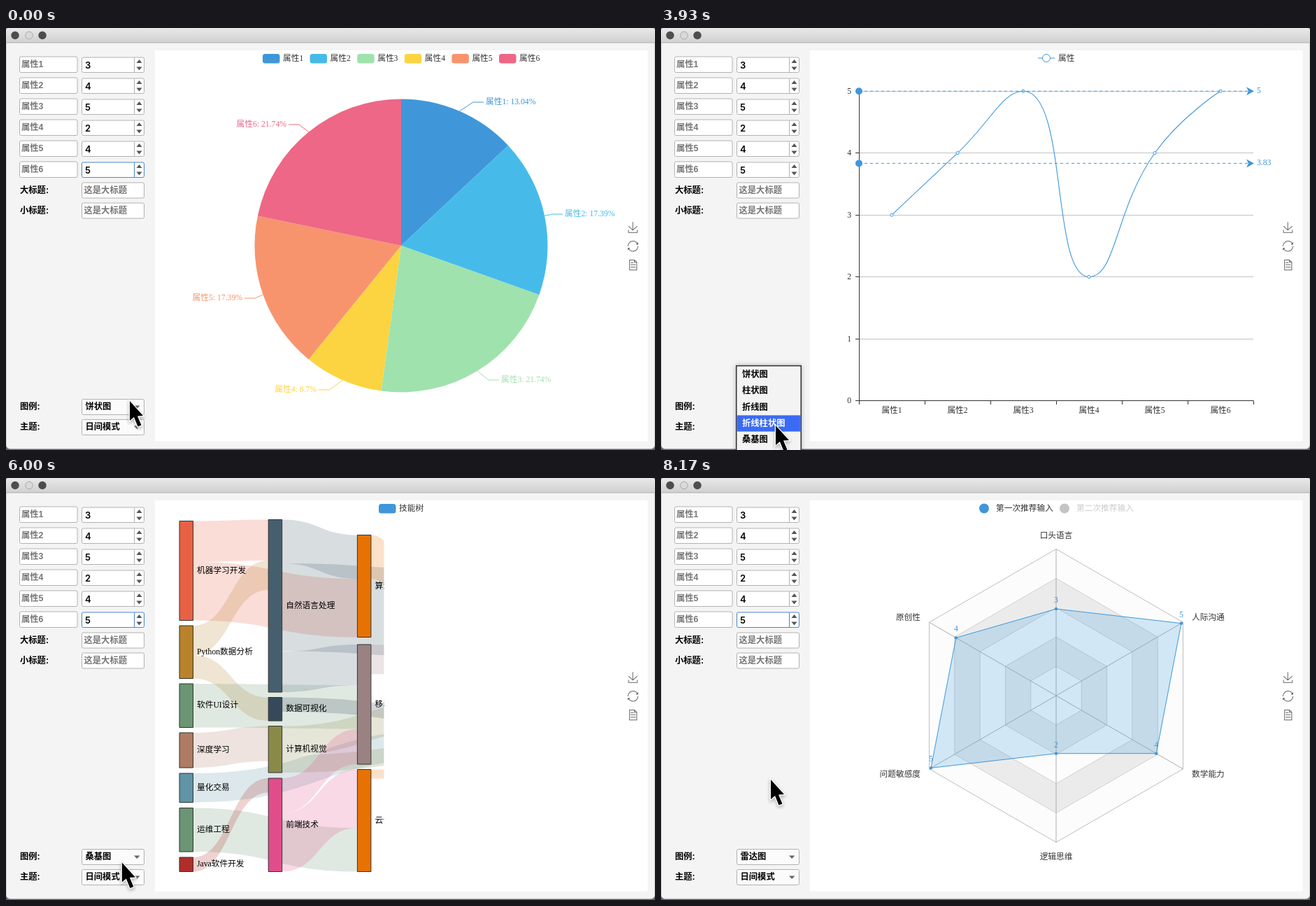
Write an HTML page with a canvas that moves like this. It is 928x603 px and loops after 8.21 s.

```html
<!DOCTYPE html>
<html lang="zh">
<head>
<meta charset="utf-8">
<title>图表</title>
<style>
html,body{margin:0;width:100%;height:100%;overflow:hidden;background:#f4f4f4}
canvas{display:block}
</style>
</head>
<body>
<canvas id="stage" width="928" height="603"></canvas>
<script>
const c = document.getElementById('stage').getContext('2d');
const LOOP = 8210, GROW = 650, FADE = 140;
const UI = '"Liberation Sans","Noto Sans CJK SC","Noto Sans CJK",sans-serif';
const SERIF = '"Liberation Serif","Noto Sans CJK SC","Noto Sans CJK",serif';
const BLUE = '#3f97da', CYAN = '#46bbea', TEAL = '#6fdcde', GREEN = '#9fe2ad',
      YELLOW = '#fcd441', ORANGE = '#f7946e', PINK = '#ee6786';
const vals = [3, 4, 5, 2, 4, 5];
const kinds = ['饼状图', '柱状图', '折线图', '折线柱状图', '桑基图', '雷达图'];
const starts = [0, 947, 2231, 4300, 5650, 7676];
const menus = [
  {open: 150, hover: 420, fade: 940}, {open: 1340, hover: 1450, fade: 2230},
  {open: 3400, hover: 3750, fade: 4290}, {open: 4960, hover: 5250, fade: 5640},
  {open: 6710, hover: 7100, fade: 7660}
];
const track = [
  [0, 177, 533], [300, 176, 533], [700, 172, 531], [1340, 168, 540], [1430, 167, 549],
  [1700, 163, 553], [2400, 163, 553], [2800, 166, 544], [3450, 166, 544], [3930, 164, 568],
  [4400, 164, 566], [4700, 163, 543], [5030, 162, 542], [5430, 159, 563], [5750, 160, 563],
  [6200, 170, 540], [6750, 170, 540], [7200, 165, 561], [7700, 163, 560], [8150, 157, 431], [8210, 157, 431]
];

const clamp = (v, a, b) => Math.max(Math.min(a, b), Math.min(Math.max(a, b), v));
const cubicOut = x => 1 - (1 - x) ** 3;

function text(s, x, y, color = '#333', align = 'left', font = '11.7px ' + SERIF) {
  c.font = font;
  c.fillStyle = color;
  c.textAlign = align;
  c.textBaseline = 'middle';
  c.fillText(s, x, y);
}
const uiText = (s, x, y, color = '#000', size = 12.3) =>
  text(s, x, y + .5, color, 'left', `bold ${size}px ${UI}`);

function rect(x, y, w, h, fill) {
  c.fillStyle = fill;
  c.fillRect(x, y, w, h);
}
function box(x, y, w, h, r, fill, stroke) {
  c.beginPath();
  c.roundRect(x, y, w, h, r);
  if (fill) { c.fillStyle = fill; c.fill(); }
  if (stroke) { c.strokeStyle = stroke; c.lineWidth = 1; c.stroke(); }
}
function dot(x, y, r, fill, stroke) {
  c.beginPath();
  c.arc(x, y, r, 0, 7);
  c.fillStyle = fill;
  c.fill();
  if (stroke) { c.strokeStyle = stroke; c.lineWidth = 1; c.stroke(); }
}
function poly(pts, fill, stroke, open) {
  c.beginPath();
  pts.forEach(p => c.lineTo(p[0], p[1]));
  if (!open) c.closePath();
  if (fill) { c.fillStyle = fill; c.fill(); }
  if (stroke) { c.strokeStyle = stroke; c.lineWidth = 1; c.stroke(); }
}
const line = (x1, y1, x2, y2, color) => poly([[x1, y1], [x2, y2]], null, color, true);

const icon = {
  save: 'M5,23L29,45L54,23M5,44V58H54V44M29,45V0',
  reset: 'M47,19h10V9M56,20C52,9,40,1,27,2C13,4,2,16,2,31M13,41H3v10M4,40c4,11,16,20,29,18c14,-2,25,-14,25,-28',
  data: 'M17,17H33M45,29h-28M11,2v56H51V15L38,2zM38,2v13H51M45,42h-28',
  line: 'M4,29h7l9,-22l8,38l10,-20l3,13h14M4,58h51',
  bar: 'M7,23h10V48h-10zM25,13h10v35h-10zM43,2h10v46h-10zM3,58h54',
  stack: 'M30,2L0,17L30,33L60,17zM0,26L30,41L60,26M0,34L30,49L60,34M0,42L30,57L60,42',
  tile: 'M2,2h23V25H2zM35,2h23V25H35zM2,35h23v23H2zM35,35h23v23H35z',
  zoom: 'M0,13H27M13,27V0M32,13H58V58H13V32',
  back: 'M22,1L10,13l12,12M10,13H55V58H10V32'
};
for (const k in icon) icon[k] = new Path2D(icon[k]);

function toolbox(names, y) {
  names.forEach((n, i) => {
    c.save();
    c.translate(896.5 - 7.7, y + i * 26.8 - 7.7);
    c.scale(.257, .257);
    c.lineWidth = 3.9;
    c.strokeStyle = '#666';
    c.stroke(icon[n]);
    c.restore();
  });
}
const shortTools = () => toolbox(['save', 'reset', 'data'], 285);

function legendBox(x, label, color) {
  box(x, 37, 24.5, 13.5, 3.5, color);
  text(label, x + 29, 44);
}

function pie() {
  const colors = [BLUE, CYAN, GREEN, YELLOW, ORANGE, PINK];
  const labels = [[686, 106], [799, 266], [708, 503], [444, 517], [338, 386], [401, 138]];
  const shares = ['13.04', '17.39', '21.74', '8.7', '17.39', '21.74'];
  let sum = 0;
  vals.forEach((v, i) => {
    const a = sum / 23 * 2 * Math.PI - Math.PI / 2, b = a + v / 23 * 2 * Math.PI, m = (a + b) / 2;
    sum += v;
    c.beginPath();
    c.moveTo(565, 311);
    c.arc(565, 311, 209.5, a, b);
    c.fillStyle = colors[i];
    c.fill();
    const [x, y] = labels[i], side = i < 3 ? 1 : -1;
    poly([[565 + 209.5 * Math.cos(m), 311 + 209.5 * Math.sin(m)], [x - side * 18, y], [x - side * 3, y]], null, colors[i], true);
    text(`属性${i + 1}: ${shares[i]}%`, x, y, colors[i], side > 0 ? 'left' : 'right');
    legendBox(367 + 67.6 * i, '属性' + (i + 1), colors[i]);
  });
  shortTools();
}

const yOf = v => 532.5 - 88.45 * v;
const xOf = i => 330 + 94 * i;

function grid() {
  for (let v = 0; v <= 5; v++) {
    const y = Math.round(yOf(v) - .5) + .5;
    if (v) line(283, y, 847, y, '#c2c2c2');
    line(278, y, 283, y, '#333');
    text(v, 272, y, '#333', 'right');
  }
}
function axes() {
  line(283.5, 90, 283.5, 533, '#333');
  line(283, 532.5, 847.5, 532.5, '#333');
  for (let i = 0; i < 7; i++) {
    const x = Math.round(283 + 94 * i) + .5;
    line(x, 533, x, 538, '#333');
    if (i < 6) text('属性' + (i + 1), xOf(i), 546.5, '#333', 'center');
  }
}

function bars(p) {
  grid();
  const colors = [BLUE, TEAL, YELLOW, ORANGE];
  const g = cubicOut(p);
  vals.forEach((v, i) => colors.forEach((col, k) => {
    const y = yOf(v * g);
    rect(292.5 + 94 * i + 19.9 * k, y, 15.6, 532.5 - y, col);
  }));
  axes();
  ['Science', 'Engineering', 'Technology', 'Mathematics'].forEach((s, k) =>
    legendBox([388.5, 463.5, 558.7, 652.3][k], s, colors[k]));
  toolbox(Object.keys(icon), 204.5);
}

// Smooth spline whose handles stay within each segment's bounds.
function spline(pts) {
  c.beginPath();
  c.moveTo(...pts[0]);
  let h = pts[0];
  for (let i = 1; i < pts.length; i++) {
    const a = pts[i - 1], b = pts[i], n = pts[i + 1];
    let h1 = b, h2 = b;
    if (n) {
      const l1 = Math.hypot(b[0] - a[0], b[1] - a[1]), l2 = Math.hypot(n[0] - b[0], n[1] - b[1]);
      const q = l2 / (l1 + l2);
      h2 = b.map((v, k) => clamp(v + (n[k] - a[k]) * .5 * q, v, n[k]));
      h1 = b.map((v, k) => clamp(v - (h2[k] - v) * l1 / l2, a[k], v));
      h2 = b.map((v, k) => v + (v - h1[k]) * l2 / l1);
    }
    c.bezierCurveTo(...h, ...h1, ...b);
    h = h2;
  }
  c.strokeStyle = BLUE;
  c.lineWidth = 1.1;
  c.stroke();
}

function markLine(y, label) {
  c.setLineDash([4, 4]);
  line(283, y, 840, y, BLUE);
  c.setLineDash([]);
  dot(283, y, 5, BLUE);
  poly([[848, y], [837, y - 6], [840, y], [837, y + 6]], BLUE);
  text(label, 852, y, BLUE);
}

function lines(p, withBars) {
  const g = cubicOut(p);
  grid();
  if (withBars) vals.forEach((v, i) => rect(292.5 + 94 * i, yOf(v * g), 75.2, 88.45 * v * g, BLUE));
  axes();
  const pts = vals.map((v, i) => [xOf(i), yOf(v)]);
  c.save();
  c.beginPath();
  c.rect(283, 60, 564 * p + (p === 1 ? 10 : 0), 480);
  c.clip();
  spline(pts);
  pts.forEach(q => dot(q[0], q[1], 2.1, '#fff', BLUE));
  c.restore();
  markLine(90.3 + 28 * (1 - g), '5');
  markLine(193.4 + 92 * (1 - g), '3.83');
  line(539, 43, 563, 43, BLUE);
  dot(551, 43, 5.5, '#fff', BLUE);
  text('属性', 568, 43.5);
  shortTools();
}

// Nodes: column, top, height, colour, label.
const nodes = [
  [0, 61.5, 142, '#e86144', '机器学习开发'], [0, 211, 75.5, '#b9822b', 'Python数据分析'],
  [0, 294, 62.5, '#6c9574', '软件UI设计'], [0, 364, 50, '#ae7b64', '深度学习'],
  [0, 422, 41.5, '#6094a6', '量化交易'], [0, 471.5, 62.5, '#6c9574', '运维工程'],
  [0, 542, 20.5, '#b02e29', 'Java软件开发'],
  [1, 59.5, 246.5, '#465f6e', '自然语言处理'], [1, 313.5, 33.5, '#36495a', '数据可视化'],
  [1, 354.5, 66.5, '#8a8a48', '计算机视觉'], [1, 429, 133.5, '#e04d8a', '前端技术'],
  [2, 81.5, 146, '#e67204', '算法工程'], [2, 238, 171, '#9a8283', '移动端技术'],
  [2, 416.5, 146, '#e67204', '云计算开发'],
  [3, 130, 271, '#f4f1e4', '算法优化'], [4, 273, 129.5, '#e25079', '']
];
// Links: from, to, height, offset at each end.
const links = [
  [0, 7, 58.5, 0, 0], [0, 11, 83.5, 58.5, 62.5], [1, 7, 42, 0, 58.5], [1, 8, 33.5, 42, 0],
  [2, 12, 62.5, 0, 58], [3, 9, 50, 0, 0], [4, 14, 41.5, 0, 229.5], [5, 13, 62.5, 0, 83.5],
  [6, 10, 20.5, 0, 0], [7, 11, 62.5, 0, 0], [7, 14, 125.5, 62.5, 0], [7, 12, 58, 188.5, 0],
  [8, 15, 20.5, 0, 71], [9, 14, 41.5, 0, 187.7], [9, 15, 25, 41.5, 91.5], [10, 12, 50, 0, 121],
  [10, 13, 83.5, 50, 0], [11, 14, 62.5, 0, 125.3], [12, 15, 42, 0, 29], [13, 15, 13, 0, 116.5],
  [14, 15, 29, 0, 0]
];
const colX = n => 248 + 127.2 * n[0];

function sankey(p) {
  legendBox(533, '技能树', BLUE);
  c.save();
  c.beginPath();
  c.rect(238, 32, 560 * p, 558);
  c.clip();
  c.globalAlpha = .21;
  for (const [from, to, h, o1, o2] of links) {
    const a = nodes[from], b = nodes[to];
    const x1 = colX(a) + 19.5, x2 = colX(b), m = (x1 + x2) / 2, y1 = a[1] + o1, y2 = b[1] + o2;
    c.beginPath();
    c.moveTo(x1, y1);
    c.bezierCurveTo(m, y1, m, y2, x2, y2);
    c.lineTo(x2, y2 + h);
    c.bezierCurveTo(m, y2 + h, m, y1 + h, x1, y1 + h);
    c.fillStyle = a[3];
    c.fill();
  }
  c.globalAlpha = 1;
  for (const n of nodes) {
    box(colX(n), n[1], 19.5, n[2], 0, n[3], '#333');
    text(n[4], colX(n) + 25, n[1] + n[2] / 2, '#000');
  }
  c.restore();
  shortTools();
}

function radar(p) {
  const g = cubicOut(p);
  const at = (i, r) => [565 - r * Math.sin(i * Math.PI / 3), 311 - r * Math.cos(i * Math.PI / 3)];
  const hex = r => vals.map((_, i) => at(i, r));
  for (let k = 5; k; k--) poly(hex(41.9 * k), k % 2 ? '#fcfcfc' : '#ebebeb', k === 5 ? '#bdbdbd' : '#d0d0d0');
  hex(209.5).forEach(q => line(565, 311, q[0], q[1], '#adadad'));
  const pts = vals.map((v, i) => at(i, 41.9 * v * g));
  poly(pts, 'rgba(65,160,220,.23)', BLUE);
  pts.forEach((q, i) => {
    dot(q[0], q[1], 2.2, BLUE);
    text(vals[i], q[0], q[1] - 12, BLUE, 'center');
  });
  [['口头语言', 565, 83, 'center'], ['原创性', 371, 199.5, 'right'], ['问题敏感度', 371, 424, 'right'],
   ['逻辑思维', 565, 541.5, 'center'], ['数学能力', 759, 424, 'left'], ['人际沟通', 759, 199.5, 'left']]
    .forEach(([s, x, y, al]) => text(s, x, y, '#333', al));
  dot(462, 43.5, 7, BLUE);
  text('第一次推荐输入', 479, 44);
  dot(577, 43.5, 7, '#c4c4c4');
  text('第二次推荐输入', 594, 44, '#ccc');
  shortTools();
}

const charts = [pie, bars, p => lines(p, false), p => lines(p, true), sankey, radar];

function frameWindow() {
  rect(0, 0, 928, 603, '#56696c');
  box(0, 0, 928, 601.5, [4, 4, 6, 6], '#f4f4f4', '#a8a8a8');
  const g = c.createLinearGradient(0, 0, 0, 21);
  g.addColorStop(0, '#e9e9e9');
  g.addColorStop(1, '#d0d0d0');
  box(0, 0, 928, 21, [4, 4, 0, 0], g);
  rect(0, 20.5, 928, 1, '#b0b0b0');
  dot(13, 10.5, 5.7, '#4d4d4d');
  dot(33, 10.5, 5.3, '#d9d9d9', '#aaa');
  dot(52, 10.5, 5.7, '#4d4d4d');
  rect(213, 32, 704.5, 558.5, '#fff');
}

function form(t, focus, kind) {
  vals.forEach((v, i) => {
    const y = 52.5 + 30 * i, edge = focus && i === 5 ? '#4a86c8' : '#b2b2b2';
    box(19.5, y - 11.5, 82.5, 22.5, 2, '#fff', '#b2b2b2');
    uiText('属性' + (i + 1), 22, y, '#777');
    box(108.5, y - 10.5, 89, 21.5, 2, '#fff', edge);
    line(183.5, y - 10, 183.5, y + 10.5, edge);
    poly([[186.5, y - 2.5], [190.5, y - 7.5], [194.5, y - 2.5]], '#555');
    poly([[186.5, y + 3], [190.5, y + 8], [194.5, y + 3]], '#555');
    text(v, 113, y + 1.5, '#000', 'left', `600 13px Inter,${UI}`);
  });
  const blink = t % 700;
  if (focus && blink > 50 && blink < 400) rect(121, 196, 1, 14, '#000');
  ['大标题:', '小标题:'].forEach((s, i) => {
    const y = 232 + 29 * i;
    uiText(s, 20, y);
    box(108.5, y - 11, 89, 22, 2, '#fff', '#b2b2b2');
    uiText('这是大标题', 111.5, y, '#777');
  });
  [['图例:', kinds[kind]], ['主题:', '日间模式']].forEach(([s, v], i) => {
    const y = 541.5 + 29 * i;
    uiText(s, 20, y);
    box(108.5, y - 11, 89, 22, 2, '#fbfbfb', '#b2b2b2');
    uiText(v, 113.5, y);
    poly([[183, y - 2], [191.5, y - 2], [187.2, y + 2.5]], '#666');
  });
}

function popup(t, m, k) {
  const top = Math.min(503.3, 541.8 - 23.2 * k), pick = t < m.hover ? k : k + 1;
  c.save();
  c.globalAlpha = clamp(1 - (t - m.fade) / FADE, 0, 1);
  c.shadowColor = 'rgba(0,0,0,.3)';
  c.shadowBlur = 6;
  rect(107, top - 13.5, 94, 143, '#333');
  c.shadowColor = 'transparent';
  rect(108.5, top - 12, 91, 140, '#f3f3f3');
  kinds.forEach((s, i) => {
    const y = top + 23.2 * i;
    if (i === pick) rect(108.5, y - 11.6, 91, 23.2, '#3b6bf5');
    uiText(s, 116, y, i === pick ? '#fff' : '#000');
  });
  c.restore();
}

function pointer(t) {
  const i = Math.max(1, track.findIndex(k => k[0] > t));
  const a = track[i - 1], b = track[i];
  let u = (t - a[0]) / (b[0] - a[0]);
  u = u * u * (3 - 2 * u);
  c.save();
  c.translate(a[1] + (b[1] - a[1]) * u, a[2] + (b[2] - a[2]) * u);
  c.beginPath();
  [[0, 0], [0, 28], [6, 23], [11.5, 36.5], [16.5, 34.5], [11, 21.5], [19, 21]].forEach(q => c.lineTo(...q));
  c.closePath();
  c.shadowColor = 'rgba(0,0,0,.35)';
  c.shadowBlur = 4;
  c.shadowOffsetY = 2;
  c.lineWidth = 2.6;
  c.strokeStyle = '#fff';
  c.stroke();
  c.shadowColor = 'transparent';
  c.fillStyle = '#000';
  c.fill();
  c.restore();
}

function draw(t) {
  const kind = starts.filter(s => s <= t).length - 1;
  const k = menus.findIndex(m => t >= m.open && t < m.fade + FADE);
  const m = menus[k];
  const shown = menus.filter(n => n.fade <= t).length;
  frameWindow();
  form(t, !m || t >= m.fade, shown);
  charts[kind](Math.min(1, (t - starts[kind]) / GROW));
  if (m) popup(t, m, k);
  pointer(t);
}

const t0 = performance.now();
function tick() {
  draw((performance.now() - t0) % LOOP);
  requestAnimationFrame(tick);
}
tick();
</script>
</body>
</html>
```
